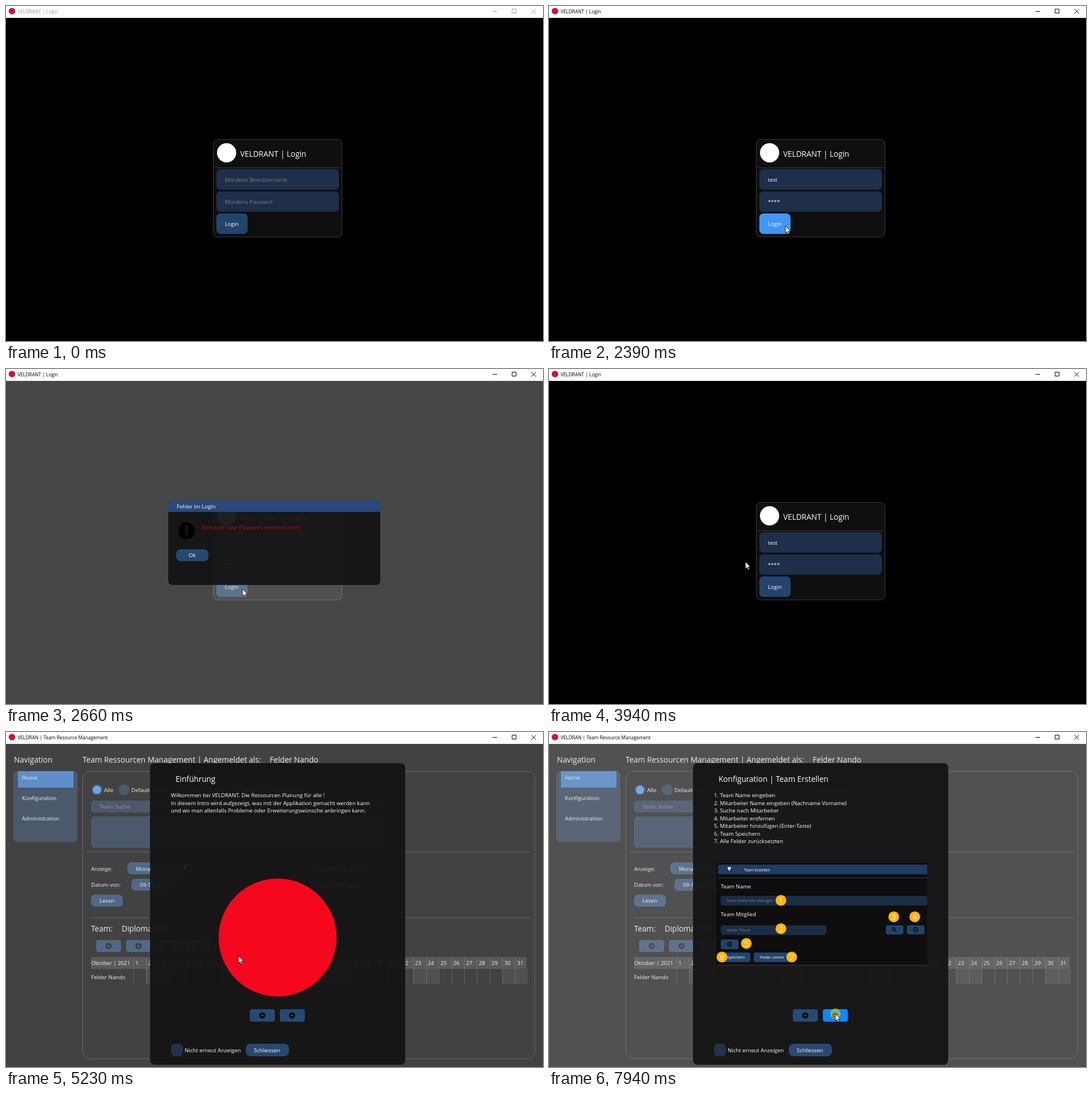
An HTML page for the animation above (8000 ms loop, 947 by 591 pixels).

```html
<!DOCTYPE html>
<html lang="de">
<head>
<meta charset="utf-8">
<title>Login</title>
<style>
html, body { margin: 0; width: 100%; height: 100%; overflow: hidden; background: #000; }
svg { display: block; font-family: "Open Sans", "Noto Sans", sans-serif; }
text { white-space: pre; }
</style>
</head>
<body>
<svg id="stage" width="947" height="591" viewBox="0 0 947 591"></svg>
<script>
const LOOP = 8000;
const BASE = 9.6, HEAD = 13.6;
const FRAME = 'rgba(41,74,122,.54)', BUTTON = 'rgba(66,150,250,.4)';
const HOVER = '#4296fa', ACTIVE = '#0f87fa', LINE = 'rgba(110,110,128,.5)', MUTED = '#808080';
const APP = 'VELDRANT', USER = 'Felder Nando';

// Markup helpers: boxes take two corners, labels take their vertical middle.
const box = (x, y, x2, y2, r, fill, extra = '') =>
  `<rect x="${x}" y="${y}" width="${x2 - x}" height="${y2 - y}" rx="${r}" fill="${fill}" ${extra}/>`;
const label = (x, y, str, size = BASE, fill = '#fff', extra = '') =>
  `<text x="${x}" y="${y + size * .36}" font-size="${size}" fill="${fill}" ${extra}>${str}</text>`;
const dot = (x, y, r, fill, extra = '') => `<circle cx="${x}" cy="${y}" r="${r}" fill="${fill}" ${extra}/>`;
const path = (d, fill, extra = '') => `<path d="${d}" fill="${fill}" ${extra}/>`;
const rule = (x, x2, y) => box(x, y, x2, y + 1, 0, LINE);
const vline = (x, y, y2) => box(x, y, x + 1, y2, 0, LINE);
const outline = (x, y, x2, y2, r, fill = 'none') =>
  box(x + .5, y + .5, x2 - .5, y2 - .5, r, fill, `stroke="${LINE}"`);
const group = (id, ...parts) => `<g id="${id}">${parts.join('')}</g>`;
const button = (x, y, x2, y2, r, str, tx, size = BASE, id = '') =>
  box(x, y, x2, y2, r, BUTTON, id && `id="${id}"`) + label(tx, (y + y2) / 2 + .5, str, size);
const arrow = (x, y, dir) =>
  dot(x, y, 5.5, '#0b0b0b') +
  path(`M${x + 2.5 * dir} ${y}l${-2.5 * dir}-2v1.2h${-2.5 * dir}v1.6h${2.5 * dir}v1.2z`, '#3d5878');
const triangle = (x, y, r, fill) => path(`M${x - r} ${y - r}h${2 * r}l${-r} ${2 * r}z`, fill);
const badges = (r, points) => points.map(([x, y], i) =>
  dot(x, y, r, '#ffb60a') + label(x, y, i + 1, 13.5, '#fff', 'text-anchor="middle"')).join('');

function loginPage() {
  return group('login',
    outline(365, 235, 593, 408, 8, '#0f0f0f'),
    dot(389, 259, 17, '#fff'),
    label(413, 261.5, APP + ' | Login', HEAD),
    rule(368, 590, 285),
    box(371, 288, 587, 324, 7, FRAME), label(386, 307, '', BASE, '#fff', 'id="user"'),
    box(371, 327, 587, 363, 7, FRAME), label(386, 346, '', BASE, '#fff', 'id="pass"'),
    button(371, 366, 426, 402, 7, 'Login', 386, BASE, 'loginBtn'));
}

function calendar() {
  const col = day => 225 + (day - 1) * 22.42;
  let out = box(150, 397, 918, 418, 0, '#303033');
  for (let day = 1; day <= 31; day++) {
    const x = Math.round(col(day));
    if (day % 7 === 2 || day % 7 === 3) out += box(x, 418, Math.round(col(day + 1)), 445, 0, '#202422');
    out += vline(x, 397, 445);
    out += label(231 + (day - 1) * 22.53, 407.5, day, BASE, '#fff', 'text-anchor="middle"');
  }
  return out + label(150, 407.5, 'Oktober | 2021') + label(150, 432.5, USER);
}

function mainPage() {
  const radios = [[160.5, 'Alle'], [208.5, 'Default Teams'], [307, 'Custom Teams'], [404, 'Suche nach Mitarbeiter']];
  return group('main',
    box(0, 21, 947, 591, 0, '#0f0f0f'),
    label(14, 49, 'Navigation', HEAD),
    box(13, 69, 126, 194, 7, FRAME), box(21, 69, 119, 98, 0, '#3778c6'),
    label(28, 81, 'Home'), label(28, 117, 'Konfiguration'), label(28, 153, 'Administration'),
    label(135, 49, 'Team Ressourcen Management | Angemeldet als:', HEAD), label(465, 49, USER, HEAD),
    outline(135, 69, 933, 577, 13),
    ...radios.map(([x, str]) => dot(x, 102, 9.8, FRAME) + label(x + 12.5, 103, str)),
    dot(160.5, 102, 7.3, HOVER),
    box(150, 121, 667, 142, 6, FRAME), label(165, 131.5, 'Team Suche', BASE, MUTED),
    box(150, 149, 667, 204, 6, FRAME),
    rule(142, 925, 211),
    label(150, 241.5, 'Anzeige:'), box(214, 230, 328, 251, 7, BUTTON), label(229, 241.5, 'Monat'),
    triangle(316, 240, 4.5, '#fff'),
    label(150, 270, 'Datum von:'), button(221, 259, 299, 280, 7, '09-10-2021', 236),
    box(537, 231, 557, 251, 6, FRAME), label(560, 241.5, 'Mögliche Stunden'),
    box(537, 259, 557, 280, 6, FRAME), label(560, 270, 'Anzeige Tage'),
    button(150, 287, 206, 308, 7, 'Lesen', 165),
    rule(150, 925, 327),
    label(150, 347.5, 'Team:', HEAD), label(204, 347.5, 'Diplomarbeit', HEAD),
    ...[0, 1, 2, 3].map(i => box(159 + i * 52.7, 367, 203 + i * 52.7, 388, 4, BUTTON) +
      arrow(181 + i * 52.7, 377.5, i % 2 ? 1 : -1)),
    calendar());
}

function errorDialog() {
  return group('error',
    box(286, 232, 660, 381, 7, 'rgba(20,20,20,.94)'),
    path('M286 252V239a7 7 0 0 1 7-7H653a7 7 0 0 1 7 7V252z', '#294a7a'),
    label(301, 243, 'Fehler im Login'),
    dot(318.5, 285.5, 15, '#000'),
    path('M316.5 277h4l-.8 11h-2.4z', '#1c1c1c'), dot(318.5, 292, 2, '#1c1c1c'),
    label(345, 279.5, 'Benutzer oder Passwort stimmen nicht', BASE, '#d00010'),
    button(300, 318, 357, 339, 8, 'Ok', 322, BASE, 'okBtn'));
}

const page = (id, title, lines, ...art) => group(id,
  label(299, 83, title, HEAD),
  ...lines.map((str, i) => label(291, 111.8 + i * 13.5, str)), ...art);
const numbered = lines => lines.map((str, i) => `${i + 1}. ${str}`);

function homeShot() {
  const S = 5.25, L = 7.4;
  const radios = [[378, 'Alle'], [404, 'Default Teams'], [456, 'Custom Teams'], [509, 'Suche Nach Mitarbeiter']];
  return [
    box(291, 232, 652, 441, 0, '#0e0e0e'), box(291, 232, 652, 245, 0, '#fff'),
    dot(297, 238.5, 3.2, '#f58a1f'), label(303, 239, APP + ' | Team Resource Management', 4.6, '#111'),
    label(299, 262, 'Navigation', L),
    label(364, 262, 'Team Ressourcen Management | Angemeldet als:', L), label(542, 262, USER, L),
    box(299, 282, 360, 354, 4, '#1b2c46'), box(303, 282, 356, 298, 0, '#23487a'),
    label(307, 289, 'Home', S), label(307, 310, 'Konfiguration', S), label(307, 331, 'Administration', S),
    path('M365.5 441V281q0-7.5 7-7.5H652', 'none', `stroke="${LINE}" stroke-width=".8"`),
    ...radios.map(([x, str]) => dot(x, 297, 5.5, '#1b2c46') + label(x + 7.3, 297.5, str, S)),
    dot(378, 297, 4.2, HOVER),
    box(373, 308, 640, 320, 3, '#1b2c46'), label(380, 314, 'Team Suche', S, MUTED),
    box(373, 324, 640, 356, 3, '#1b2c46'), rule(369, 652, 360),
    label(373, 382, 'Anzeige:', S), box(407, 376, 468, 388, 3, '#1b2c46'), label(415, 382, 'Monat', S),
    box(456, 376, 468, 388, 3, '#23456d'), triangle(462, 381.5, 2.8, '#fff'),
    label(373, 399, 'Datum von:', S), button(407, 392, 449, 404, 3, '2021-10-01', 415, S),
    button(373, 409, 403, 421, 3, 'Lesen', 381, S),
    dot(577, 381.5, 5.7, '#1b2c46'), label(584, 382, 'Mögliche Stunden', S),
    dot(577, 398, 5.7, '#1b2c46'), label(584, 399, 'Anzeige Tage', S),
    rule(373, 652, 440),
    badges(9, [[352, 298], [436, 280], [436, 313], [436, 338], [481, 379], [559, 388], [464, 397], [419, 415]])
  ].join('');
}

function teamShot() {
  const S = 6.7, L = 9.5, ink = 'fill="none" stroke="#050505" stroke-width="1.3"';
  return [
    box(295, 231, 667, 412, 0, '#0e0e0e'),
    path('M667 234H301.500a3.500 3.500 0 0 0-3.500 3.500V247.500a3.500 3.500 0 0 0 3.500 3.500H667z', '#1f3c62'),
    triangle(318, 242, 3.5, '#fff'), label(344, 243.5, 'Team Erstellen', S),
    rule(298, 667, 257),
    label(303, 273, 'Team Name', L),
    box(303, 289, 667, 306, 3, '#1b2c46'), label(313, 298, 'Team Name hier eintragen', S, MUTED),
    label(303, 322, 'Team Mitglied', L),
    box(303, 341, 489, 358, 4, '#1b2c46'), label(313, 350, 'Hösler Timon', S, MUTED),
    box(594, 341, 625, 357, 3, BUTTON), `<path d="M610 350l3 3" ${ink}/><circle cx="608" cy="348" r="2.5" ${ink}/>`,
    box(631, 341, 662, 357, 3, BUTTON), `<path d="M644 349h5" ${ink}/><circle cx="646.5" cy="349" r="4" ${ink}/>`,
    box(303, 366, 334, 383, 3, BUTTON), `<path d="M316 374.500h5m-2.500-2.500v5" ${ink}/><circle cx="318.500" cy="374.500" r="4" ${ink}/>`,
    button(303, 389, 355, 406, 4, 'Speichern', 314, S),
    button(361, 389, 426, 406, 4, 'Felder Leeren', 372, S),
    rule(298, 667, 411),
    badges(9.5, [[409, 297], [409, 347], [608, 326], [645, 326], [348, 373], [305, 397], [428, 397]])
  ].join('');
}

function introDialog() {
  return group('intro',
    box(254, 55, 704, 587, 8, 'rgba(20,20,20,.94)'),
    page('welcome', 'Einführung', [
      `Wilkommen bei ${APP}. Die Ressourcen Planung für alle !`,
      'In diesem Intro wird aufgezeigt, was mit der Applikation gemacht werden kann',
      'und wo man allenfalls Probleme oder Erweiterungswünsche anbringen kann.'
    ], dot(479, 362.5, 104, '#f5071e')),
    page('home', 'Home Bildschirm', numbered([
      'Navigation zwischen den verschiedenen Bereichen',
      'Auswahl zwischen allen, selbst erstellten oder default Teams',
      'Eingabe Feld für die Suche nach einem Team',
      'Liste aller gefundenen Teams',
      'Auswahl zwischen Wochen - / Monats / Jahresansicht',
      'Optionale Auswahl um die Darstellung zu verfeinern',
      'Datumsauswahl um die Daten gezielt zu verfolgen',
      'Neues Lesen der Daten']), homeShot()),
    page('team', 'Konfiguration | Team Erstellen', numbered([
      'Team Name eingeben',
      'Mitarbeiter Name eingeben (Nachname Vorname)',
      'Suche nach Mitarbeiter',
      'Mitarbeiter entfernen',
      'Mitarbeiter hinzufügen (Enter-Taste)',
      'Team Speichern',
      'Alle Felder zurücksetzten']), teamShot()),
    box(430, 489, 474, 511, 4, BUTTON), arrow(452, 500, -1),
    box(483, 489, 527, 511, 4, BUTTON, 'id="nextBtn"'), arrow(504.5, 500, 1),
    box(291, 550, 312, 572, 7, FRAME), label(315, 562, 'Nicht erneut Anzeigen'),
    button(423, 550, 499, 572, 8, 'Schliessen', 437));
}

const titleBar = () => box(0, 0, 947, 21, 0, '#fff') + dot(10.5, 9, 5.8, '#d5122f') +
  label(20.5, 9.8, '', 8.35, '#000', 'id="title"') +
  path('M858 9.500h8M892.500 5.500h7v7h-7zM926.500 5.500l8 8m0-8l-8 8', 'none', 'id="controls" stroke="#000"');

const spinnerDots = group('spinner', ...Array.from({ length: 8 }, (_, i) => {
  const a = i * Math.PI / 4;
  return dot(509.5 + 50.5 * Math.cos(a), 351.5 + 50.5 * Math.sin(a), 8.5, '#000');
}));

document.getElementById('stage').innerHTML = [
  box(0, 0, 947, 591, 0, '#000'), loginPage(), mainPage(),
  box(0, 21, 947, 591, 0, '#ccc', 'id="dim"'),
  box(386, 303, 439, 311, 0, '#000', 'id="mask"'),
  errorDialog(), spinnerDots, introDialog(), titleBar(),
  dot(0, 0, 9.2, 'rgba(220,215,30,.58)', 'id="ripple"'),
  path('M0 0V12.600l2.900-2.700 2 4.500 2-.9-2-4.300h3.900z', '#fff', 'id="cursor" stroke="#000" stroke-width=".8"')
].join('');

const el = {};
document.querySelectorAll('[id]').forEach(node => el[node.id] = node);

const clamp = v => Math.max(0, Math.min(1, v));
const ease = v => v * v * (3 - 2 * v);
const within = (t, a, b) => t >= a && t < b;
const show = (node, on) => node.setAttribute('display', on ? 'inline' : 'none');

const cursorPath = [
  [140, 520, 520], [820, 517, 337], [890, 517, 337], [1090, 484, 306], [1680, 484, 306], [1920, 417, 388],
  [2700, 417, 388], [2920, 378, 352], [2990, 378, 352], [3340, 338, 330], [3800, 338, 330],
  [4350, 389, 391], [5130, 389, 391], [5230, 410, 395], [5430, 410, 395], [5600, 418, 388],
  [6200, 505, 493], [7300, 505, 493], [7540, 505, 497]];
const clicks = [[890, 950], [2180, 2320], [3800, 3870], [4620, 4690], [6260, 6330],
  [6600, 6740], [7070, 7210], [7540, 7610], [7940, 8000]];

function cursorAt(t) {
  const next = cursorPath.findIndex(k => k[0] > t);
  if (next === 0) return cursorPath[0].slice(1);
  if (next < 0) return cursorPath[cursorPath.length - 1].slice(1);
  const [t0, x0, y0] = cursorPath[next - 1], [t1, x1, y1] = cursorPath[next];
  const k = ease((t - t0) / (t1 - t0));
  return [x0 + (x1 - x0) * k, y0 + (y1 - y0) * k];
}

function paintButton(node, x, y, pressed, enabled) {
  const b = node.getBBox();
  const over = enabled && x >= b.x && x <= b.x + b.width && y >= b.y && y <= b.y + b.height;
  node.setAttribute('fill', over ? (pressed ? ACTIVE : HOVER) : BUTTON);
}

function fillField(node, str, placeholder) {
  node.textContent = str ?? placeholder;
  node.setAttribute('fill', str == null ? MUTED : '#fff');
}

function typed(t, start, step, str) {
  return t < start ? null : str.slice(0, Math.floor((t - start) / step));
}

function paintSpinner(t) {
  const peak = -Math.PI / 8 - (t - 4760) * .003;
  [...el.spinner.children].forEach((node, i) => {
    const grow = Math.max(0, Math.cos(i * Math.PI / 4 - peak));
    const mix = (a, b) => Math.round(a + (b - a) * grow);
    node.setAttribute('r', 8.5 * (1 + grow));
    node.setAttribute('fill', `rgba(${mix(36, 48)},${mix(104, 56)},${mix(156, 64)},.85)`);
  });
}

function render(t) {
  const [x, y] = cursorAt(t);
  const pressed = clicks.some(([a, b]) => within(t, a, b));
  const failed = within(t, 2450, 3870), loading = within(t, 4690, 5130), inside = t >= 5130;

  el.title.textContent = t < 4690 ? APP + ' | Login' : APP.slice(0, -1) + ' | Team Resource Management';
  el.title.setAttribute('fill', t < 70 ? '#999' : '#000');
  el.controls.setAttribute('stroke', t < 70 ? '#999' : '#000');

  const secondTry = t >= 4000;
  fillField(el.user, secondTry ? '' : typed(t, 890, 110, 'test'), 'Mordeno Benutzername');
  fillField(el.pass, t >= 4150 ? '*'.repeat(13) : typed(t, 1380, 70, '****'), 'Mordeno Passwort');

  show(el.login, !inside);
  show(el.main, inside);
  show(el.mask, secondTry && !inside);
  show(el.error, failed);
  show(el.spinner, loading);
  show(el.intro, inside);
  show(el.welcome, t < 6330);
  show(el.home, within(t, 6330, 7610));
  show(el.team, t >= 7610);

  const dim = failed ? .35 * clamp((t - 2450) / 167) : loading ? .6 : inside ? .35 * clamp((t - 5130) / 130) : 0;
  el.dim.setAttribute('fill', loading ? '#262626' : '#ccc');
  el.dim.setAttribute('fill-opacity', dim);
  if (loading) paintSpinner(t);

  if (!inside) paintButton(el.loginBtn, x, y, pressed, !failed && !loading);
  if (failed) paintButton(el.okBtn, x, y, pressed, true);
  if (inside) paintButton(el.nextBtn, x, y, pressed, true);

  show(el.ripple, pressed);
  el.ripple.setAttribute('transform', `translate(${x} ${y})`);
  show(el.cursor, t >= 140);
  el.cursor.setAttribute('transform', `translate(${x} ${y})`);
}

const start = performance.now();
function tick(now) {
  render(Math.max(0, now - start) % LOOP);
  requestAnimationFrame(tick);
}
render(0);
requestAnimationFrame(tick);
</script>
</body>
</html>
```
